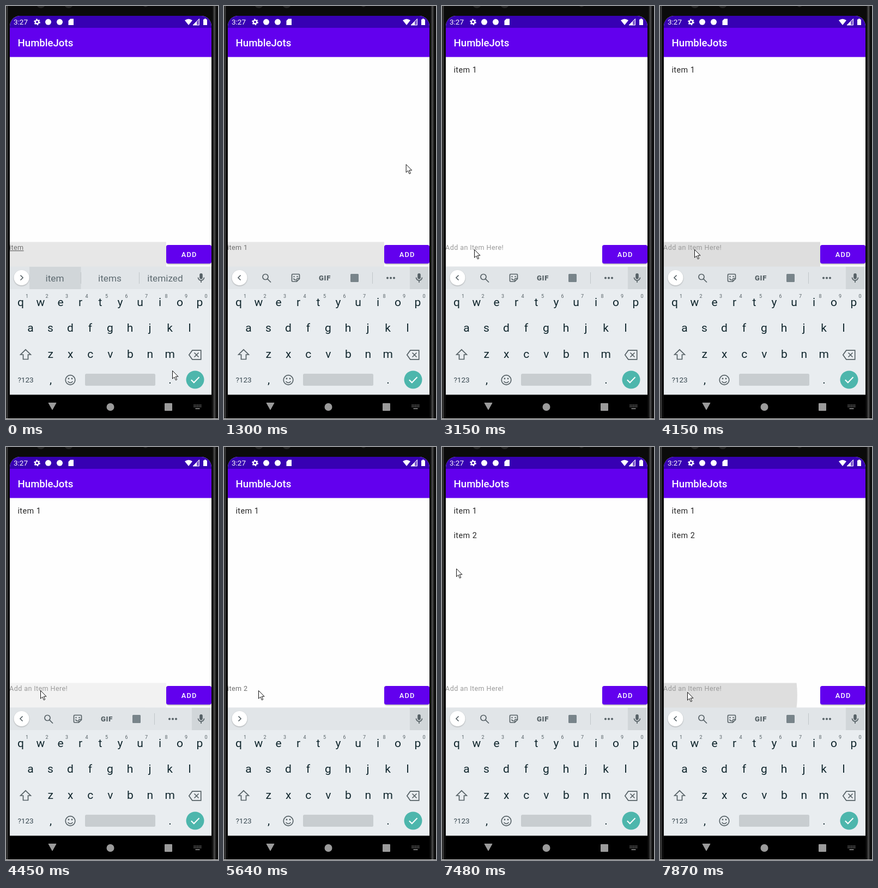
An HTML page that plays this animation: 389x757 px, repeating every 7990 ms.

```html
<!DOCTYPE html>
<html lang="en">
<head>
<meta charset="utf-8">
<title>To-do list demo</title>
<style>
  html, body { margin: 0; width: 100%; height: 100%; overflow: hidden; background: #0b0b0b; }
  svg { display: block; width: 389px; height: 757px; font-family: Roboto, "Noto Sans", sans-serif; }
  .line { fill: none; stroke: #566166; stroke-width: 1.7; }
  .ink { fill: #566166; }
  .mid { text-anchor: middle; }
  .key { font-size: 21px; fill: #10262d; }
  .digit { font-size: 9px; fill: #566166; }
  .word { font-size: 17.2px; fill: #5d6a70; }
  .row { font-size: 14.4px; letter-spacing: .45px; }
  .field { font-size: 12.6px; letter-spacing: .38px; }
</style>
</head>
<body>
<svg viewBox="0 0 389 757" xmlns="http://www.w3.org/2000/svg">
  <defs>
    <clipPath id="screen"><path d="M7 757V37a19 19 0 0 1 19-19H358a19 19 0 0 1 19 19V757Z"/></clipPath>
    <clipPath id="fieldClip"><rect x="7" y="432.5" width="287" height="45.5"/></clipPath>
    <clipPath id="addClip"><rect x="294" y="438" width="83" height="34" rx="3.5"/></clipPath>
    <filter id="soft" x="-30%" y="-30%" width="160%" height="180%"><feGaussianBlur stdDeviation="1.2"/></filter>
    <linearGradient id="edge"><stop stop-color="#0b0b0b"/><stop offset=".5" stop-color="#4c4c4c"/><stop offset="1" stop-color="#0b0b0b"/></linearGradient>
  </defs>

  <!-- phone body -->
  <rect width="389" height="757" fill="#0b0b0b"/>
  <rect width="4" height="757" fill="url(#edge)"/>
  <rect x="379" width="7" height="757" fill="url(#edge)"/>
  <g fill="#262626"><circle cx="64" cy="-4" r="8"/><circle cx="115" cy="-4" r="8"/><circle cx="256" cy="-3" r="5"/></g>

  <g clip-path="url(#screen)">
    <rect x="7" y="18" width="370" height="739" fill="#fefefe"/>
    <rect x="7" y="18" width="370" height="22" fill="#3700b3"/>
    <rect x="7" y="40" width="370" height="53.5" fill="#6200ee"/>

    <!-- status bar -->
    <g fill="#fff">
      <text x="14" y="34" font-size="13.5">3:27</text>
      <circle cx="57" cy="29.3" r="3.2" fill="none" stroke="#fff" stroke-width="2.4"/>
      <circle cx="57" cy="29.3" r="5" fill="none" stroke="#fff" stroke-width="1.8" stroke-dasharray="2.6 2.64"/>
      <circle cx="77.5" cy="29.3" r="5.5"/>
      <circle cx="98.5" cy="29.3" r="5.5"/>
      <path d="M118 23.5h6v11.5h-9.5v-8Z"/>
      <path d="M328 26.3q7-5 14 0l-7 8.7Z"/>
      <path d="M354.5 23.5V35H343Z" fill-opacity=".35" stroke="#fff"/>
      <path d="M350 28.4V35h-6.4Z"/>
      <path d="M362 24.5h2v-1.3h3v1.3h2V35h-7Z"/>
    </g>
    <text x="21.6" y="74" font-size="18.6" font-weight="500" fill="#fff">HumbleJots</text>

    <!-- list -->
    <text id="row1" class="row" x="21.4" y="121.5">item 1</text>
    <text id="row2" class="row" x="21.4" y="166.5">item 2</text>

    <!-- entry field and button -->
    <g clip-path="url(#fieldClip)">
      <rect id="focus" x="7" y="432" width="287" height="46" opacity=".09"/>
      <circle id="fieldRip" cy="455"/>
    </g>
    <text id="entry" class="field" x="6.1" y="447" xml:space="preserve"></text>
    <rect x="295" y="440" width="81" height="33.5" rx="3.5" opacity=".3" filter="url(#soft)"/>
    <rect x="294" y="438" width="83" height="34" rx="3.5" fill="#6200ee"/>
    <g clip-path="url(#addClip)"><circle id="addRip" cy="455" fill="#fff"/></g>
    <text class="mid" x="336.2" y="460" font-size="12.8" font-weight="500" letter-spacing="1.3" fill="#fff">ADD</text>

    <!-- suggestion strip -->
    <rect x="7" y="477.5" width="370" height="42" fill="#e1e5e8"/>
    <g id="words">
      <rect x="43" y="478" width="94.5" height="41" fill="#d1d6d9"/>
      <path d="M137.5 488V509M244.5 488V509" stroke="#c0c6c9"/>
      <g class="word mid"><text x="89.5" y="505">item</text><text x="190.5" y="505">items</text><text x="292" y="505">itemized</text></g>
    </g>
    <rect id="micBack" x="341" y="478" width="34" height="41" fill="#d1d6d9"/>
    <g id="tools">
      <circle class="line" cx="76" cy="496.5" r="5"/>
      <path class="line" d="M79.6 500.1L86 506.5"/>
      <path class="line" d="M126 491.5h11q1.5 0 1.5 1.5v7l-5 5h-7.5q-1.5 0-1.5-1.5v-10.5q0-1.5 1.5-1.5ZM138.5 499.5h-3.5q-1.500 0-1.5 1.5v4M127.5 499.5q1.5 3 4.5 2.5"/>
      <circle class="ink" cx="128.5" cy="496" r="1.2"/><circle class="ink" cx="134.5" cy="496" r="1.2"/>
      <text class="mid ink" x="185" y="502.7" font-size="13" font-weight="900" letter-spacing=".7">GIF</text>
      <rect x="232" y="491" width="15" height="15" rx="1.5" fill="#78848a"/>
      <path d="M272.5 488V509" stroke="#c0c6c9"/>
      <g class="ink"><circle cx="300" cy="498.5" r="2"/><circle cx="306" cy="498.5" r="2"/><circle cx="312" cy="498.5" r="2"/></g>
    </g>
    <circle cx="28.5" cy="499" r="14" opacity=".25" filter="url(#soft)"/>
    <circle cx="28.5" cy="498" r="14" fill="#fff"/>
    <path id="chevron" class="line"/>
    <rect class="ink" x="355.2" y="490" width="5.6" height="10.5" rx="2.8"/>
    <path class="line" d="M352.5 497.5a5.5 5.5 0 0 0 11 0M358 503V507"/>

    <!-- keyboard -->
    <rect x="7" y="519" width="370" height="194" fill="#e9edf0"/>
    <g id="keys" class="mid"></g>
    <path class="line" d="M36 629.8l9.3 9.2h-4.8v8.5h-9v-8.5h-4.8Z"/>
    <path class="line" d="M335.8 639.5l6-8.3H357.700V647.8H341.8ZM345.5 635.5l8 8M353.5 635.5l-8 8"/>
    <text class="mid" x="36" y="690" font-size="13.5" fill="#37474f">?123</text>
    <circle class="line" cx="118" cy="685.5" r="8.8"/>
    <path class="line" d="M113.5 688q4.5 5 9 0"/>
    <circle class="ink" cx="115" cy="683" r="1.4"/><circle class="ink" cx="121" cy="683" r="1.4"/>
    <rect x="145" y="674" width="129" height="22" rx="2.5" fill="#c8cdd0"/>
    <circle cx="347" cy="685" r="16.5" fill="#4db6ac"/>
    <path d="M339.8 685.3l5 5L354.5 680.3" fill="none" stroke="#fff" stroke-width="2"/>

    <!-- navigation bar -->
    <rect x="7" y="712.5" width="370" height="45"/>
    <g fill="#9b9b9b">
      <path d="M78 727.5H92L85 740Z" stroke="#9b9b9b" stroke-linejoin="round"/>
      <circle cx="191.5" cy="735" r="7"/>
      <rect x="291" y="728" width="14" height="14" rx="1"/>
    </g>
    <g stroke="#8b8b8b" stroke-width="1.7">
      <path d="M344.5 731.5H358.5M344.5 734.5H358.5" stroke-dasharray="1.8 1.2"/>
      <path d="M347.5 738H355.5"/>
    </g>
  </g>
  <path d="M0 756.5H389" stroke="#d8d8d8"/>
  <path id="pointer" d="M.5 .5V15.2L3.9 12L6.4 17.8L8.7 16.8L6.2 11.2H11Z" fill="#fff" stroke="#111"/>
</svg>

<script>
const LOOP = 7990, STEP = 135;
const ADDED = [2180, 7070];
const $ = id => document.getElementById(id);
const clamp = v => Math.max(0, Math.min(1, v));
const set = (id, attrs) => Object.entries(attrs).forEach(([k, v]) => $(id).setAttribute(k, v));
const show = (id, on) => set(id, { visibility: on ? "visible" : "hidden" });

const spread = (chars, cls, x, y, gap = 36.5) =>
  [...chars].map((c, i) => `<text class="${cls}" x="${x + i * gap}" y="${y}">${c}</text>`).join("");
$("keys").innerHTML =
  spread("qwertyuiop", "key", 27, 550) + spread("asdfghjkl", "key", 45, 597) +
  spread("zxcvbnm", "key", 81.8, 645) + spread(",.", "key", 82, 691.5, 219) +
  spread("1234567890", "digit", 38.5, 535);

// Each glide is a curve: start time, number of steps, bend, end.
const glides = [
  [890, 7, [335, 40], [344, 455]],
  [1880, 1, [341, 453], [338, 452]],
  [2320, 7, [180, 430], [59, 446]],
  [3850, 1, [61, 446], [63, 446]],
  [6160, 6, [425, 570], [365, 461]],
  [7210, 4, [-70, -411], [50, 449]]
];
function pointerAt(t) {
  let pos = [305, 668];
  for (const [start, steps, bend, end] of glides) {
    if (t < start) break;
    const q = clamp((Math.floor((t - start) / STEP) + 1) / steps);
    const p = q * q * (3 - 2 * q);
    pos = pos.map((v, i) => (1 - p) ** 2 * v + 2 * p * (1 - p) * bend[i] + p * p * end[i]);
  }
  return pos;
}

// A press spreads from the pointer, then fades out.
function ripple(id, presses, t, { size, speed, peak, life, fade }) {
  const press = presses.filter(p => p <= t).pop();
  const age = t - press;
  const on = press !== undefined && age < life;
  set(id, {
    cx: on ? pointerAt(press)[0] : 0,
    r: on ? size + speed * age : 0,
    opacity: on ? peak * clamp((life - age) / fade) : 0
  });
}

function typedAt(t) {
  if (t < ADDED[0]) return "item 1".slice(0, t < 150 ? 4 : t < 750 ? 5 : 6);
  if (t < 5070 || t >= ADDED[1]) return "";
  return "item 2".slice(0, 1 + Math.floor((t - 5070) / 114));
}

function draw(t) {
  const typed = typedAt(t);
  const spelling = /^[a-z]+$/.test(typed);
  const tools = t >= 1030 && t < 5070 || t >= 6040;

  $("entry").textContent = typed || "Add an Item Here!";
  set("entry", { fill: typed ? "#707070" : "#9a9a9a", "text-decoration": spelling ? "underline" : "none" });
  show("words", spelling);
  show("tools", tools);
  show("micBack", !spelling);
  set("chevron", { d: tools ? "M30.5 493.5l-4.5 4.5 4.5 4.5" : "M26.5 493.5l4.5 4.5-4.5 4.5" });

  ADDED.forEach((time, i) => {
    show("row" + (i + 1), t >= time);
    set("row" + (i + 1), { fill: t < time + STEP ? "#757575" : "#262626" });
  });

  show("focus", t < ADDED[0]);
  ripple("fieldRip", [4000, 7870], t, { size: 201, speed: .9, peak: .125, life: 600, fade: 400 });
  ripple("addRip", [2180, 6940], t, { size: 65, speed: .5, peak: .24, life: 400, fade: 200 });

  set("pointer", { transform: `translate(${pointerAt(t).join(" ")})` });
}

const start = performance.now();
function tick() {
  draw((performance.now() - start) % LOOP);
  requestAnimationFrame(tick);
}
tick();
</script>
</body>
</html>
```
